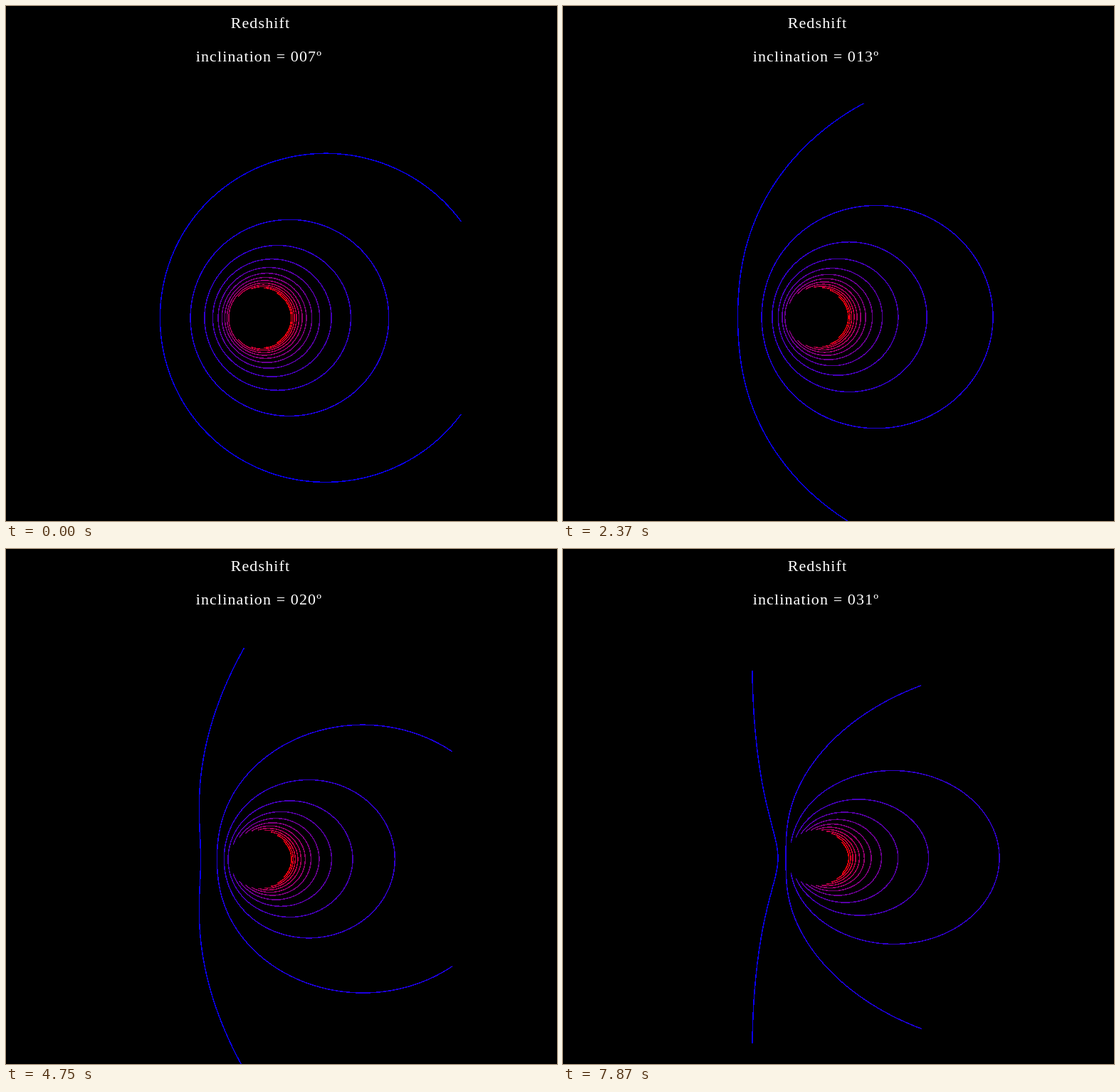
An HTML page for the animation above (8 s loop, 774 by 724 pixels).

```html
<!DOCTYPE html>
<html lang="en">
<head>
<meta charset="utf-8">
<title>Redshift</title>
<style>
  html, body { margin: 0; width: 100%; height: 100%; overflow: hidden; background: #000; }
  svg { position: absolute; left: 0; top: 0; width: 774px; height: 724px; }
  path { fill: none; stroke-width: 1.5; stroke-linecap: round; shape-rendering: crispEdges; }
  text { font: 22px "Liberation Serif", "Times New Roman", serif; letter-spacing: 1.12px; fill: #fff; white-space: pre; }
</style>
</head>
<body>
<svg viewBox="0 0 774 724">
  <g id="plot"></g>
  <text x="315.7" y="31">Redshift</text>
  <text id="label" x="266.7" y="78">inclination = 007º</text>
</svg>
<script>
const plot = document.getElementById('plot');
const label = document.getElementById('label');

const LOOP = 8000, FIRST = 7;
// Start time of each one-degree step
const steps = [0, 430, 830, 1200, 1570, 1970, 2370, 2800, 3080, 3480, 3760, 4190, 4440,
  4750, 5030, 5460, 5710, 5990, 6260, 6510, 6790, 7070, 7350, 7620, 7870];

const CX = 356.2, CY = 439.8, SCALE = 6.16;   // pixels per unit of mass
const R_IN = 6, R_OUT = 50, NR = 110, NA = 240, BANDS = 14;

const radius = i => R_IN * Math.pow(R_OUT / R_IN, i / NR);
const angle = j => 2 * Math.PI * j / NA;

// One path per contour level, blue to red
const lines = Array.from({ length: BANDS - 1 }, (_, k) => {
  const line = document.createElementNS('http://www.w3.org/2000/svg', 'path');
  const red = Math.round(255 * (k + 0.5) / (BANDS - 1));
  line.setAttribute('stroke', `rgb(${red}, 0, ${255 - red})`);
  return plot.appendChild(line);
});

// Image position of a disc point, with light bending
function project(r, a, sinI, cosI) {
  const c = -Math.sin(a) * sinI;
  const d = Math.sqrt(r * r + 2 * r * (1 - c) / (1 + c));
  return [d * Math.cos(a), d * Math.sin(a) * cosI];
}

// 1 + z for gas on a circular orbit
const shift = (r, x, sinI) => (1 + sinI * x / Math.pow(r, 1.5)) / Math.sqrt(1 - 3 / r);

function draw(deg) {
  const inc = deg * Math.PI / 180, sinI = Math.sin(inc), cosI = Math.cos(inc);
  const z = [];
  let min = Infinity, max = -Infinity;
  for (let i = 0; i <= NR; i++) {
    z.push([]);
    for (let j = 0; j <= NA; j++) {
      const r = radius(i), v = shift(r, project(r, angle(j), sinI, cosI)[0], sinI);
      z[i].push(v);
      min = Math.min(min, v);
      max = Math.max(max, v);
    }
  }

  const step = (max - min) / BANDS;
  const data = lines.map(() => '');

  for (let i = 0; i < NR; i++) {
    for (let j = 0; j < NA; j++) {
      const corners = [[i, j], [i + 1, j], [i + 1, j + 1], [i, j + 1]];
      const vals = corners.map(([p, q]) => z[p][q]);
      const from = Math.max(1, Math.ceil((Math.min(...vals) - min) / step));
      const to = Math.min(BANDS - 1, Math.floor((Math.max(...vals) - min) / step));
      for (let k = from; k <= to; k++) {
        const level = min + k * step, hits = [];
        for (let e = 0; e < 4; e++) {
          const n = (e + 1) % 4, u = vals[e], v = vals[n];
          if ((u < level) === (v < level)) continue;
          const f = (level - u) / (v - u), [p, q] = corners[e], [s, t] = corners[n];
          const [x, y] = project(radius(p + f * (s - p)), angle(q + f * (t - q)), sinI, cosI);
          hits.push(`${(CX + x * SCALE).toFixed(2)} ${(CY - y * SCALE).toFixed(2)}`);
        }
        for (let h = 0; h + 1 < hits.length; h += 2) {
          data[k - 1] += `M${hits[h]}L${hits[h + 1]}`;
        }
      }
    }
  }

  lines.forEach((line, k) => line.setAttribute('d', data[k]));
  label.textContent = `inclination = ${String(deg).padStart(3, '0')}º`;
}

let shown = 0;
function tick() {
  const t = performance.now() % LOOP;
  const deg = FIRST - 1 + steps.filter(s => s <= t).length;
  if (deg !== shown) draw(shown = deg);
  requestAnimationFrame(tick);
}
tick();
</script>
</body>
</html>
```
